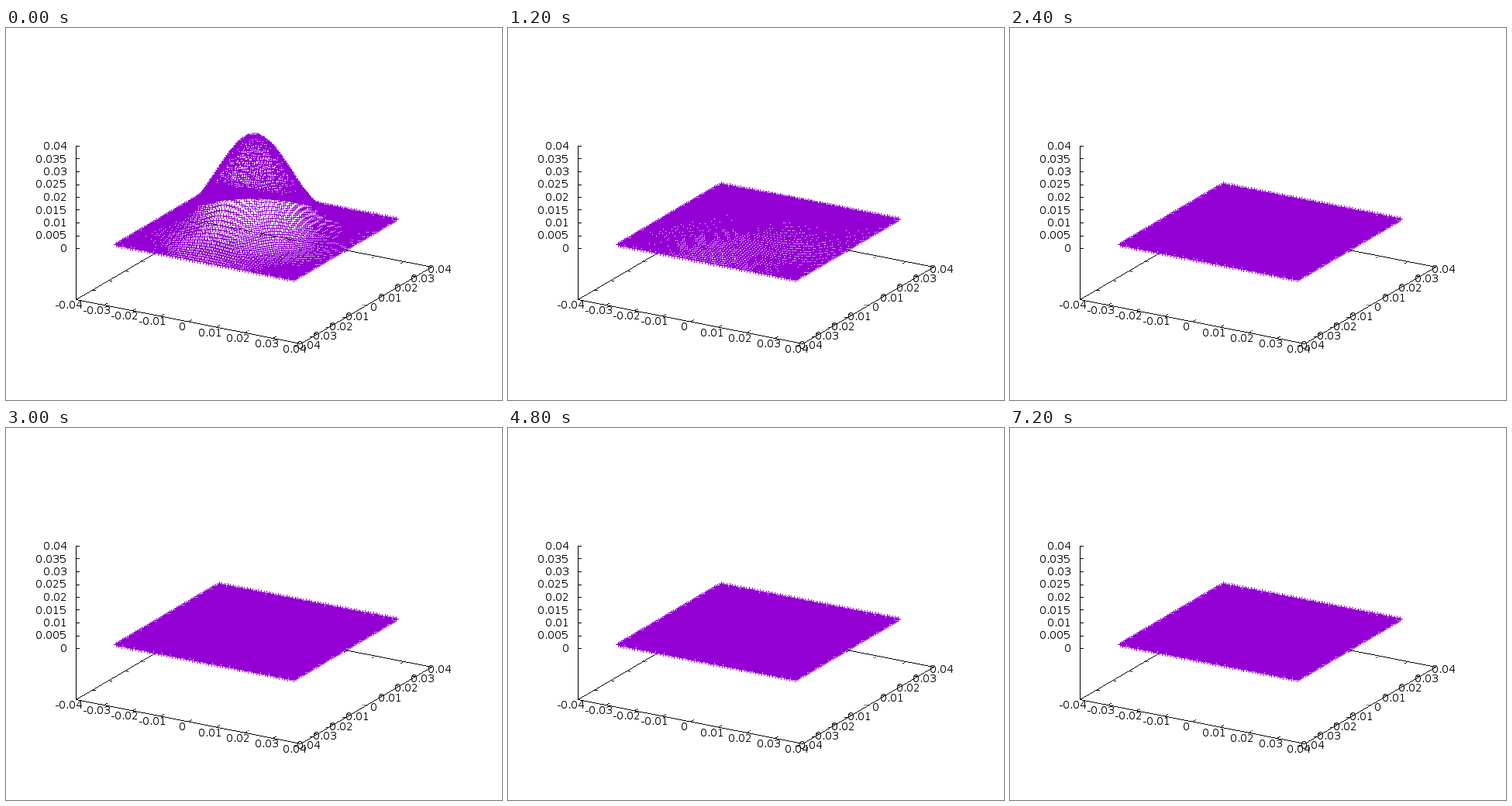
These frames come from a looping animation (640x480 px, 8 s). A matplotlib script:

```python
import numpy as np
import matplotlib.pyplot as plt
from matplotlib.animation import FuncAnimation

W, H, DPI = 640, 480, 100
STEP_TICKS, LAST_STEP = 3, 12
PURPLE = (0x94, 0x00, 0xD3)

# Screen vectors of the box: origin of the floor, its two edges, pixels per unit of z
ORIGIN = np.array([90, 350])
X_EDGE = np.array([290, 57])
Y_EDGE = np.array([169, -99])
Z_SCALE, FLOOR_DROP = 3300, 66
SPAN = 0.08

# Sampled plate and the heat spreading over it from a Gaussian spot
PEAK, SPOT_VAR = 0.04, 1.24e-4
START_VAR, VAR_PER_STEP = 1.32e-4, 2.7e-4
grid = np.arange(-31, 33) / 1000

# Crisp one-pixel stems for the labels
plt.rcParams["text.hinting"] = "default"
plt.rcParams["text.hinting_factor"] = 1


def project(x, y, z):
    u, v = x / SPAN + 0.5, y / SPAN + 0.5
    px = ORIGIN[0] + u * X_EDGE[0] + v * Y_EDGE[0]
    py = ORIGIN[1] - FLOOR_DROP + u * X_EDGE[1] + v * Y_EDGE[1] - Z_SCALE * z
    return np.rint(px).astype(int), np.rint(py).astype(int)


def profile(variance):
    """One axis of the heat kernel, held at zero on both ends."""
    length = grid[-1] - grid[0]
    k = np.arange(1, 60)[:, None] * np.pi / length
    modes = np.sin(k * (grid - grid[0])) * np.sin(-k * grid[0])
    scale = 2 / length * np.sqrt(2 * np.pi * SPOT_VAR)
    return scale * (modes * np.exp(-k**2 * variance / 2)).sum(axis=0)


def draw_line(image, start, end):
    count = int(np.abs(np.subtract(end, start)).max()) + 1
    px = np.rint(np.linspace(start[0], end[0], count)).astype(int)
    py = np.rint(np.linspace(start[1], end[1], count)).astype(int)
    image[py, px] = 0


def box_image():
    image = np.full((H, W, 3), 255, np.uint8)
    right, back = ORIGIN + X_EDGE, ORIGIN + Y_EDGE
    far = right + Y_EDGE
    for a, b in ((ORIGIN, right), (right, far), (far, back), (back, ORIGIN)):
        draw_line(image, a, b)
    draw_line(image, ORIGIN, (ORIGIN[0], 152))

    x_tick, y_tick = np.array([4, 0.8]), np.array([4, -2.3])
    for i in range(9):
        front, left = ORIGIN + X_EDGE * i / 8, ORIGIN + Y_EDGE * i / 8
        draw_line(image, front, front + y_tick)
        draw_line(image, front + Y_EDGE, front + Y_EDGE - y_tick)
        draw_line(image, left, left + x_tick)
        draw_line(image, left + X_EDGE, left + X_EDGE - x_tick)
        y = 284 - 16.5 * i
        draw_line(image, (ORIGIN[0], y), (ORIGIN[0] + 4, y))
    return image


def surface_image(box, step):
    shape = profile(START_VAR + VAR_PER_STEP * step)
    gx, gy = np.meshgrid(grid, grid)
    px, py = project(gx, gy, PEAK * np.outer(shape, shape))
    image = box.copy()
    for d in range(-3, 4):
        image[py, px + d] = PURPLE
        image[py + d, px] = PURPLE
    return image


fig = plt.figure(figsize=(W / DPI, H / DPI), dpi=DPI, facecolor="white")
ax = fig.add_axes([0, 0, 1, 1])
ax.axis("off")


def label(x, y, value, ha="center"):
    text = f"{value:g}" if value < 0 else f" {value:g}"
    ax.text(x, y + 5, text, ha=ha, va="baseline", fontsize=14 * 72 / DPI,
            family="DejaVu Sans", color="black")


for i in range(9):
    value = (i - 4) / 100
    front = ORIGIN + X_EDGE * i / 8
    side = ORIGIN + X_EDGE + Y_EDGE * i / 8
    label(front[0] - 9.5, front[1] + 7, value)
    label(side[0] + 8, side[1] + 2.5, value)
    label(78.5, 284 - 16.5 * i, i * 0.005, ha="right")

box = box_image()
frames = [surface_image(box, step) for step in range(LAST_STEP + 1)]
plot = ax.imshow(frames[0], extent=(0, W, H, 0), interpolation="nearest",
                 aspect="auto")
ax.set_xlim(0, W)
ax.set_ylim(H, 0)


def update(frame):
    plot.set_data(frames[min(frame // STEP_TICKS, LAST_STEP)])
    return (plot,)


anim = FuncAnimation(fig, update, frames=40, interval=200, repeat=True,
                     repeat_delay=0, blit=False)
plt.show()
```
